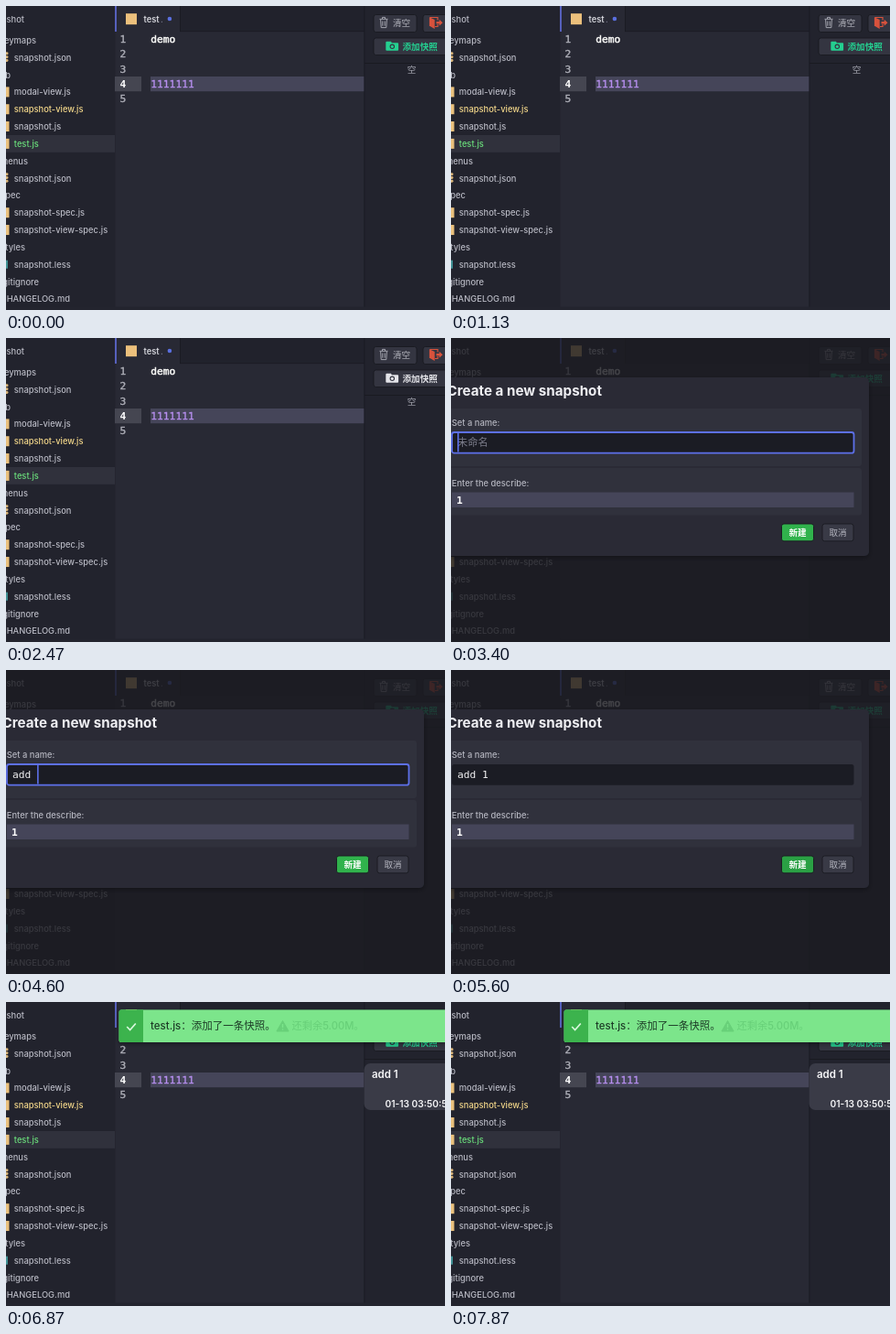
An HTML page that plays this animation: 480 by 332 pixels, repeating every 8000 ms.

```html
<!DOCTYPE html>
<html lang="zh-CN">
<head>
<meta charset="utf-8">
<title>Editor snapshot</title>
<style>
html, body { margin: 0; width: 100%; height: 100%; overflow: hidden; background: #22232d; }
svg { display: block; width: 480px; height: 332px; }
text { font: 500 9.35px Inter, "Noto Sans CJK SC", "Noto Sans CJK", sans-serif; white-space: pre; }
.mono { font: 11.25px "DejaVu Sans Mono", "Noto Sans CJK SC", "Noto Sans CJK", monospace; }
</style>
</head>
<body>
<svg id="stage" viewBox="0 0 480 332" xmlns="http://www.w3.org/2000/svg"></svg>
<script>
const LOOP = 8000;
const FOCUS = 2000;      // click into the editor
const PRESS = 2530;      // click on the add button
const OPEN = 2600;       // dialog appears
const KEYS = [3900, 4130, 4330, 4600, 4870];
const NAME = "add 1";
const HOVER = 5330, BLUR = 5500, CLOSE = 5660, NOTE = 5730;

const rect = (x, y, w, h, fill, extra = "") =>
  `<rect x="${x}" y="${y}" width="${w}" height="${h}" fill="${fill}" ${extra}/>`;
const text = (x, y, str, fill, style = "", extra = "") =>
  `<text x="${x}" y="${y}" fill="${fill}" style="${style}" ${extra}>${str}</text>`;
const mono = (x, y, str, fill, style = "", extra = "") =>
  text(x, y, str, fill, style, `class="mono" ${extra}`);
const path = (d, fill, extra = "") => `<path d="${d}" fill="${fill}" ${extra}/>`;
const heavy = (color, w = .4) => `stroke="${color}" stroke-width="${w}"`;
const END = 'text-anchor="end"', MID = 'text-anchor="middle"';

// [label, kind or right edge of a clipped folder name, colour]
const GREY = "#b8b9c3";
const TREE = [
  ["keymaps", 33], ["snapshot.json", "json"], ["lib", 5],
  ["modal-view.js", "js"], ["snapshot-view.js", "js", "#f3d78a"],
  ["snapshot.js", "js"], ["test.js", "js", "#6be07c"],
  ["menus", 24], ["snapshot.json", "json"], ["spec", 16],
  ["snapshot-spec.js", "js"], ["snapshot-view-spec.js", "js"],
  ["styles", 21], ["snapshot.less", "less"],
  [".gitignore", 36], ["CHANGELOG.md", 70]
];

function icon(kind, y) {
  if (kind === "js") return rect(-7, y - 5.5, 10.5, 11, "#e9c07c");
  if (kind === "less") return rect(-7, y - 4.5, 9, 9, "#3f8f93");
  return [-4.5, -0.7, 3.1].map(d =>
    rect(-7, y + d - 1.4, 9.5, 3, "#d9b478", 'rx="1.4"')).join("");
}

function sidebar() {
  let s = rect(0, 0, 119, 332, "#22232d") + rect(0, 141, 119, 18.8, "#30313c");
  s += text(20, 18.3, "snapshot", GREY, "", END);
  TREE.forEach(([label, kind, color = GREY], i) => {
    const y = 37.4 + 18.83 * i;
    s += typeof kind === "number"
      ? text(kind, y + 3.5, label, color, "", END)
      : icon(kind, y) + text(8.8, y + 3.5, label, color);
  });
  return s;
}

function editor() {
  let s = rect(119, 0, 273, 332, "#282934") + rect(190, 0, 202, 28, "#21222c");
  s += rect(190, 0, 1, 28, "#1a1b23") + rect(190, 27.3, 202, .8, "#1a1b23");
  s += rect(118.4, 0, .8, 332, "#1a1b23") + rect(119, 0, 2, 28, "#5660bc");
  s += rect(131, 8.2, 12, 12, "#ecc07c");
  s += text(150.5, 17.8, "test", "#d5d6dc", "font-weight:600") + text(169, 17.8, ".", "#77788a");
  s += '<circle cx="178.9" cy="14" r="2.3" fill="#5a6fe0"/>';
  s += rect(119, 77, 29, 16.2, "#454651") + rect(158, 77, 234, 16.2, "#454559");
  for (let n = 1; n <= 5; n++)
    s += n === 4 ? mono(124.6, 89.2, n, "#fff", "font-weight:700")
      : mono(124.6, 24 + 16.2 * n, n, "#adaeb7", "", heavy("#adaeb7"));
  s += mono(158.3, 40.2, "demo", "#fafaf8", "", heavy("#fafaf8", .5));
  s += mono(158.3, 89.2, "1111111", "#b78ff0", "", heavy("#b78ff0", .3));
  return s + rect(192, 77, 1.3, 16.2, "#f4f4f6", 'id="caret"');
}

const button = (x, y, w, h, fill = "#343541") =>
  rect(x, y, w, h, fill, 'rx="2.5" stroke="#191a21" stroke-width=".9"');

function panel() {
  let s = rect(392, 0, 88, 332, "#22232d") + rect(391.4, 0, 1, 332, "#1a1b23");
  s += button(402, 9.5, 47, 19) + button(456, 9.5, 40, 19) + button(402, 35, 96, 18.5);
  s += path("M408.5 14.3h9M411.5 14v-1.6h3V14M409.6 14.6l.6 9h5.6l.6-9M411.8 16.5v5.2M414.2 16.5v5.2",
    "none", 'stroke="#a3a4ae" stroke-width="1"');
  s += text(423, 22.2, "清空", "#b2b3bc", "font-size:9.6px");
  s += path("M463.5 12.5h8.5v3M463.5 12.5v9.5M472 20v2.5h-3", "none", heavy("#d8523c", 1.2));
  s += path("M463.5 12.5l5.2 2.6v9.9l-5.2-3z", "#d8523c");
  s += path("M470.5 17h3.2v-2.2l3.8 3.5-3.8 3.5v-2.2h-3.2z", "#d8523c");
  s += '<g id="add">' + path("M416.3 38.7h4.6l1 1.6h6.2q1 0 1 1v6.4q0 1-1 1h-11.8q-1 0-1-1v-8q0-1 1-1z", "currentColor");
  s += '<circle cx="422.3" cy="44.3" r="2.2" fill="none" stroke="#343541" stroke-width="1.1"/>';
  s += text(433.5, 47.7, "添加快照", "currentColor", "font-size:9.6px;font-weight:700") + "</g>";
  s += rect(392, 62, 88, 1, "#191a21");
  s += text(443.5, 73.4, "空", "#a5a6b0", "font-size:9.6px", MID + ' id="empty"');
  s += '<g id="card">' + rect(391.5, 67, 110, 51, "#3a3b47", 'rx="7"');
  s += text(400, 82.8, NAME, "#f6f6f8", "font-size:11.5px;font-weight:600");
  s += '<svg x="392" y="100" width="88" height="17.5">' +
    text(22.5, 14.6, "01-13 03:50:55", "#f6f6f8", "font-size:10.2px;font-weight:600") + "</svg></g>";
  return s;
}

function dialog() {
  let s = rect(-20, 43, 477, 195, "#2a2b36", 'rx="5" filter="url(#shade)"');
  s += rect(-20, 77, 469, 63, "#30313c", 'rx="3"') + rect(-20, 142, 469, 51.5, "#30313c", 'rx="3"');
  s += text(165, 63, "Create a new snapshot", "#eeeef2", "font-size:15.2px;font-weight:700", END);
  s += text(.8, 95.8, "Set a name:", "#b4b5bf") + text(.8, 161.6, "Enter the describe:", "#b4b5bf");
  s += rect(1, 103, 439.5, 22.7, "#1b1c24", 'rx="2.5" id="field"');
  s += mono(7, 118.4, "", "#fff", "", 'id="name"');
  s += rect(7, 104, 1.6, 20.5, "#5d70ea", 'id="bar"');
  s += rect(1, 168.5, 439.5, 16.5, "#454559");
  s += mono(6, 180.8, "1", "#fff", "font-weight:700");
  s += button(361.5, 203, 35, 18.8, "#30b24c").replace("<rect", '<rect id="ok"');
  s += text(379, 215.9, "新建", "#fff", "font-size:9.6px;font-weight:700", MID);
  s += button(406, 203, 34, 18.8, "#393a46") + text(423, 215.9, "取消", "#b4b5bf", "font-size:9.6px", MID);
  return s;
}

function notice() {
  let s = rect(123.6, 8.5, 366, 35.4, "#7be58b", 'rx="2.5" filter="url(#shade)"');
  s += path("M126.1 8.5H150v35.4h-23.9q-2.5 0-2.5-2.5v-30.4q0-2.5 2.5-2.5z", "#3cb34d");
  s += path("M132.2 27l3.4 3.5 6.2-7", "none", 'stroke="#d9f8dd" stroke-width="1.7"');
  s += text(158, 30.3, "test.js：添加了一条快照。", "#1d3d27", "font-size:11.5px");
  const pale = "#68d079";
  s += path("M302.5 20.5l6.6 11.5h-13.2z", pale, `stroke="${pale}" stroke-linejoin="round"`);
  s += path("M302.5 24v4M302.5 29.2v1.4", "none", 'stroke="#7be58b" stroke-width="1.4"');
  return s + text(312.6, 30.3, "还剩余5.00M。", pale, "font-size:11.2px");
}

const stage = document.getElementById("stage");
stage.innerHTML =
  `<defs><filter id="shade" x="-10%" y="-20%" width="120%" height="150%">
  <feDropShadow dx="0" dy="2" stdDeviation="2.5" flood-color="#000" flood-opacity=".35"/></filter></defs>` +
  editor() + sidebar() + panel() + rect(0, 328.5, 480, 3.5, "#23242e") +
  rect(0, 0, 480, 332, "#1b1b22", 'id="veil"') +
  `<g id="dialog">${dialog()}</g><g id="notice">${notice()}</g>`;

const el = {};
stage.querySelectorAll("[id]").forEach(e => el[e.id] = e);
const show = (e, on) => e.setAttribute("visibility", on ? "visible" : "hidden");
const clamp = v => Math.max(0, Math.min(1, v));
const easeOut = v => 1 - (1 - v) ** 3;
const blink = dt => dt % 800 < 400;

function render(t) {
  const open = t >= OPEN && t < CLOSE;
  const done = t >= NOTE;
  const focused = t >= FOCUS && t < PRESS;
  show(el.caret, focused && blink(t - FOCUS));
  el.add.style.color = focused ? "#e4e4e9" : "#24cf90";
  show(el.empty, !done);
  show(el.card, done);

  el.veil.setAttribute("opacity", open ? .82 * easeOut(clamp((t - OPEN) / 240)) : 0);
  show(el.dialog, open);
  const typed = KEYS.filter(k => t >= k).length;
  const editing = open && t < BLUR;
  el.name.textContent = typed ? NAME.slice(0, typed) : "未命名";
  el.name.setAttribute("fill", typed ? "#f4f4f6" : "#7b7c8a");
  el.field.setAttribute("stroke", editing ? "#5d70ea" : "#1b1c24");
  el.field.setAttribute("stroke-width", editing ? 1.8 : 0);
  el.bar.setAttribute("x", 7 + typed * 6.77);
  show(el.bar, editing && blink(t - (typed ? KEYS[typed - 1] : OPEN)));
  el.ok.setAttribute("fill", t >= HOVER ? "#2aa044" : "#30b24c");

  const p = easeOut(clamp((t - NOTE) / 160));
  show(el.notice, done);
  el.notice.setAttribute("opacity", p);
  el.notice.setAttribute("transform", `translate(0 ${-21 * (1 - p)}) scale(1 ${.05 + .95 * p})`);
}

function tick() {
  render(performance.now() % LOOP);
  requestAnimationFrame(tick);
}
tick();
</script>
</body>
</html>
```
